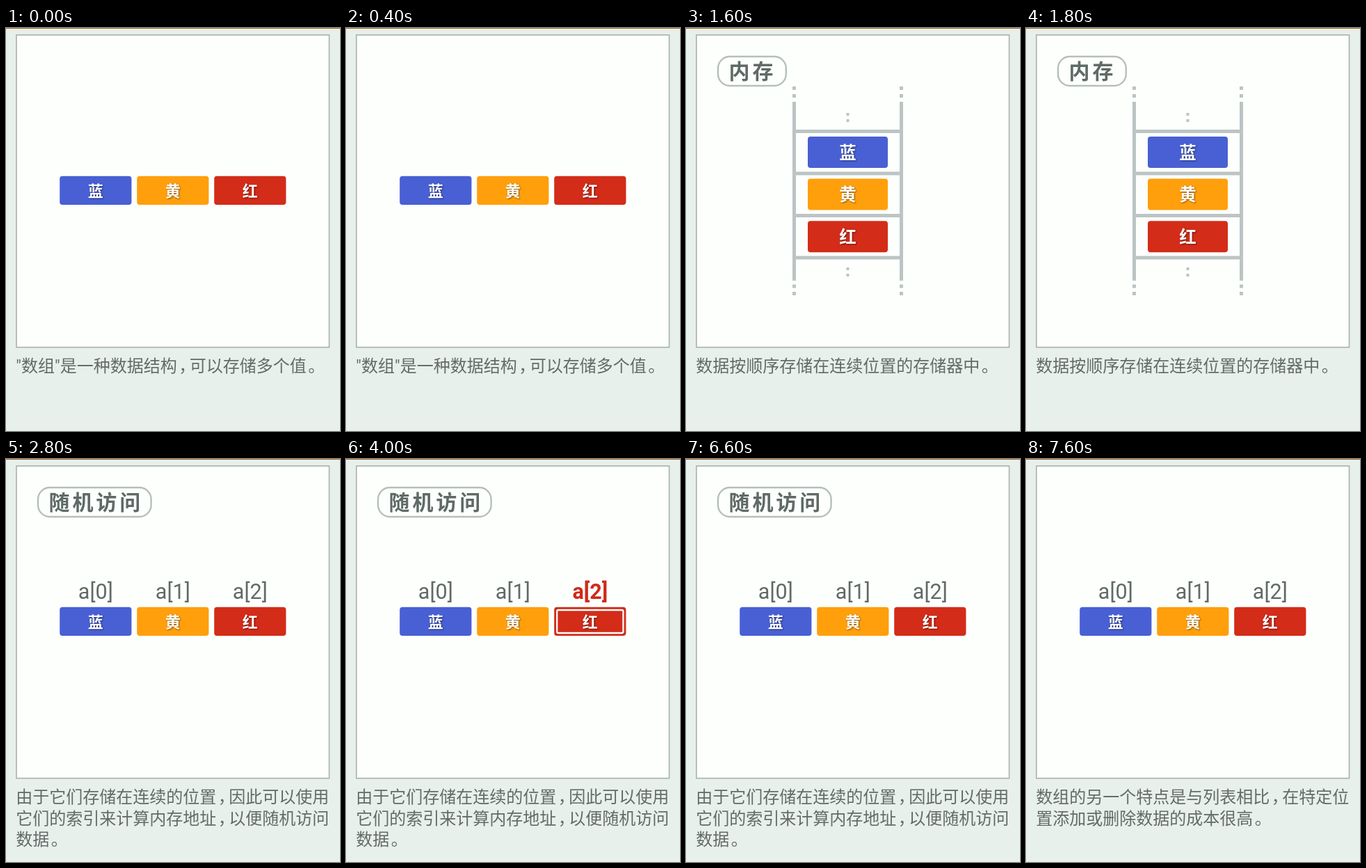
Recreate the animation shown at these times as an HTML page. Size 480x579 px, loop 8 s.

```html
<!DOCTYPE html>
<html lang="zh-CN">
<head>
<meta charset="utf-8">
<style>
  html, body { margin: 0; width: 480px; height: 579px; overflow: hidden; background: #e8f0ec; }
  svg { display: block; font-family: Roboto, "Noto Sans CJK SC", "Noto Sans CJK", sans-serif; }
  .caption { font-size: 24px; fill: #626b67; }
  .index { font-size: 30.5px; fill: #606a66; text-anchor: middle; }
  .index.on { font-weight: 700; fill: #d0291b; }
  .name { font-weight: 700; fill: #fff; text-anchor: middle; filter: drop-shadow(1px 1px 1px #0007); }
  .title { font-size: 30px; font-weight: 700; letter-spacing: 3.9px; fill: #5f6a66; }
  .pill { fill: #fdfffd; stroke: #b5bfbb; stroke-width: 2.4; }
  .rail { fill: #bcc4c4; }
</style>
</head>
<body>
<svg width="480" height="579" viewBox="0 0 480 579">
  <rect width="480" height="1" fill="#b5621a"/>
  <rect x="15" y="10" width="449.5" height="448.7" fill="#fdfffd" stroke="#a8b1ad" stroke-width="1.6"/>
  <g id="scene"></g>
</svg>
<script>
const LOOP = 8000;
const items = [['蓝', '#4860d4'], ['黄', '#ff9f0c'], ['红', '#d32c19']];

const captions = {
  intro: ['"数组"是一种数据结构，可以存储多个值。'],
  index: ['每个元素可以通过索引（数字表示数据的数', '量）进行访问。'],
  memory: ['数据按顺序存储在连续位置的存储器中。'],
  random: ['由于它们存储在连续的位置，因此可以使用', '它们的索引来计算内存地址，以便随机访问', '数据。'],
  cost: ['数组的另一个特点是与列表相比，在特定位', '置添加或删除数据的成本很高。']
};

// start time, caption, highlighted element
const steps = [
  [0, 'intro'], [600, 'index'], [1600, 'memory'], [2800, 'random'],
  [4000, 'random', 2], [4800, 'random', 0], [5800, 'random', 1],
  [6600, 'random'], [7600, 'cost']
];

const rect = (x, y, w, h, attrs) => `<rect x="${x}" y="${y}" width="${w}" height="${h}" ${attrs}/>`;
const text = (x, y, cls, s, attrs = '') => `<text x="${x}" y="${y}" class="${cls}" ${attrs}>${s}</text>`;
const rail = (x, y, w, h) => rect(x, y, w, h, 'class="rail"');
const shift = (dx, s) => `<tspan dx="${dx}">${s}</tspan>`;

// Punctuation is set three quarters of an em wide, with its mark nearer the middle
const tuck = line => line.replace(/([，。（）])(.?)/g, (_, mark, next) => {
  const [before, after] = mark === '（' ? [-8, 2] : [2.5, -8.5];
  return shift(before, mark) + (next && shift(after, next));
});

const caption = lines => lines.map((line, i) => text(14.3, 494 + i * 30.7, 'caption', tuck(line))).join('');

const title = s => rect(46, 41, 33 + s.length * 32.4, 42, 'rx="17" class="pill"') + text(61.5, 73, 'title', s);

function box([name, color], x, y, w, h, size) {
  return rect(x, y, w, h, `rx="4" fill="${color}"`) +
    text(x + w / 2, y + h / 2 + size * .38, 'name', name, `font-size="${size}"`);
}

function row(labelled, active) {
  return items.map((item, i) => {
    const x = 77.2 + i * 111, on = i === active;
    return box(item, x, 212.8, 103.2, 41.2, 22) +
      (on ? rect(x + 4, 217, 95.2, 33, 'rx="2" fill="none" stroke="#fff" stroke-width="2.3"') : '') +
      (labelled ? text(x + 51.6, 201, on ? 'index on' : 'index', `a[${i}]`) : '');
  }).join('');
}

function memory() {
  let s = '';
  for (const x of [153, 307]) {
    s += rail(x, 106, 5, 257);
    for (const y of [84, 95, 368.5, 379]) s += rail(x, y, 5, 5);
  }
  for (let i = 0; i < 4; i++) s += rail(153, 146 + i * 60.5, 159, 5);
  for (const y of [122, 131, 344, 353]) s += rail(230.5, y, 4, 4);
  return s + items.map((item, i) => box(item, 175, 156 + i * 60.6, 115, 45, 24.5)).join('');
}

function draw([, key, active]) {
  const body = key === 'memory' ? title('内存') + memory()
    : (key === 'random' ? title('随机访问') : '') + row(key !== 'intro', active);
  return body + caption(captions[key]);
}

const scene = document.getElementById('scene');
const start = performance.now();
let shown;
function tick() {
  const t = (performance.now() - start) % LOOP;
  const step = steps.findLast(s => s[0] <= t);
  if (step !== shown) scene.innerHTML = draw(shown = step);
  requestAnimationFrame(tick);
}
tick();
</script>
</body>
</html>
```
